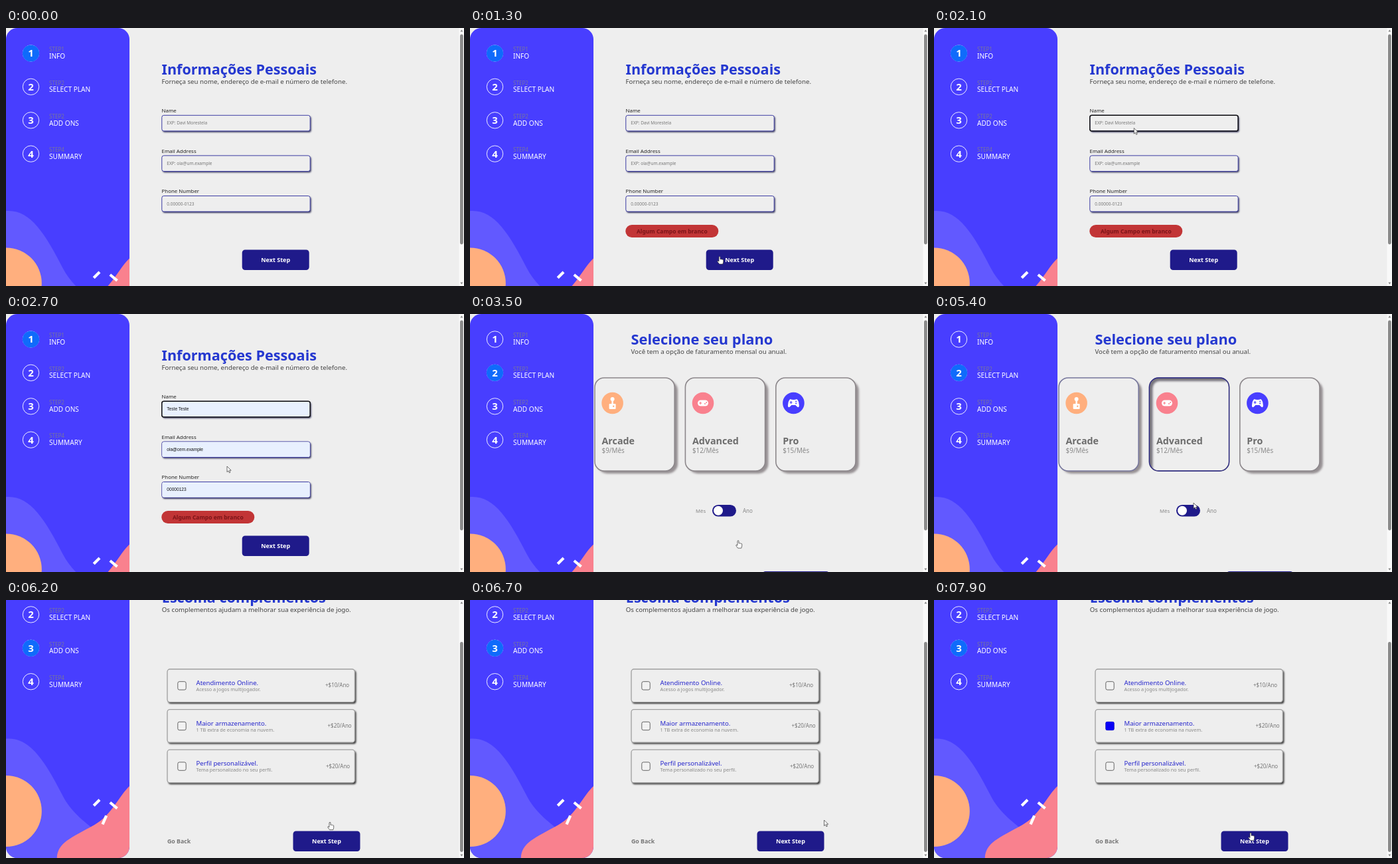
Write an HTML page that moves like this. It is 690 px wide and 388 px high and loops after 8000 ms.

```html
<!DOCTYPE html>
<html lang="pt">
<head>
<meta charset="utf-8">
<title>Formulário em etapas</title>
<style>
  html, body { margin: 0; width: 100%; height: 100%; overflow: hidden; background: #eee; }
  svg { display: block; width: 100vw; height: 100vh; }
  text { font-family: "Noto Sans", "Open Sans", sans-serif; white-space: pre; }
  .filled text { font-family: "Liberation Sans", Arial, sans-serif; }
  .soft { filter: blur(.8px); }
  .wide { filter: blur(1.6px); }
</style>
</head>
<body>
<svg id="stage" viewBox="0 0 690 388"></svg>
<script>
const LOOP = 8000, STEP = 100, SCROLL = 66.5;
const NAVY = '#1f1a8a', BLUE = '#2538d0', VIOLET = '#483eff', PEACH = '#ffaf7e', PINK = '#f9818e';

const rect = (x, y, w, h, r, fill, extra = '') =>
  `<rect x="${x}" y="${y}" width="${w}" height="${h}" rx="${r}" fill="${fill}" ${extra}/>`;
const circle = (x, y, r, fill, extra = '') =>
  `<circle cx="${x}" cy="${y}" r="${r}" fill="${fill}" ${extra}/>`;
const path = (d, fill, extra = '') => `<path d="${d}" fill="${fill}" ${extra}/>`;
const line = (color, width) => `stroke="${color}" stroke-width="${width}"`;
const text = (x, y, size, fill, str, weight = 400, anchor = 'start') =>
  `<text x="${x}" y="${y}" font-size="${size}" fill="${fill}" font-weight="${weight}" text-anchor="${anchor}">${str}</text>`;
const group = (id, body, extra = '') => `<g id="${id}" ${extra}>${body}</g>`;
const each = (list, fn) => list.map(fn).join('');

const heading = (x, y, size, title, sub) =>
  text(x, y, size, BLUE, title, 700) + text(x, y + 14, 9.7, '#444', sub);
const button = (x, y) =>
  rect(x, y, 101, 30.5, 4.5, NAVY) + text(x + 50.5, y + 18.7, 9, '#fff', 'Next Step', 700, 'middle');
const goBack = y => text(243, y, 8.8, '#777', 'Go Back', 700);

// Sidebar
const labels = [['STEP1', 'INFO'], ['STEP2', 'SELECT PLAN'], ['STEP2', 'ADD ONS'], ['STEP4', 'SUMMARY']];
const sidebar = `<clipPath id="side">${rect(0, 0, 186, 454.5, 17, '#000')}</clipPath>` +
  group('sidebar',
    rect(0, 0, 186, 455, 0, VIOLET) +
    path('M-13.8 277.9C30.9 264.2 54.9 301.6 85.8 361.6C116.7 421.5 204 432 169.6 490H-20Z', '#6259ff') +
    path('M220 343.7C179.2 321.3 174 381.8 133.5 404.5C93 427 74 433 77 462H230Z', PINK) +
    circle(0.2, 384, 53.6, PEACH) +
    path('M132.2 375.8L141 367M156.8 371L167.5 379.8M145.5 403.8L151.2 390.8', 'none', line('#fff', 4.2)),
    'clip-path="url(#side)"') +
  each(labels, ([small, big], i) => {
    const y = 38 + 50.4 * i;
    return circle(37.5, y, 12.2, 'none', line('#fff', 0.9)) +
      circle(37.5, y, 12.6, '#0f6bfb', `id="on${i}"`) +
      text(37.5, y + 5.4, 15, '#fff', i + 1, 700, 'middle') +
      text(65, y - 2.8, 8.1, '#77749c', small) +
      text(65, y + 8, 10.1, '#fff', big);
  });

// Personal details
const fields = [
  ['Name', 'EXP: Davi Morestela', 'Teste Teste'],
  ['Email Address', 'EXP: ola@um.example', 'ola@cem.example'],
  ['Phone Number', '0.00000-0123', '00000123']
];
const fieldY = i => 131.3 + 60.6 * i;
const info =
  heading(234.5, 70, 21.6, 'Informações Pessoais', 'Forneça seu nome, endereço de e-mail e número de telefone.') +
  each(fields, ([label], i) => {
    const y = fieldY(i);
    return text(234.5, y - 4.3, 7.9, '#222', label, 500) +
      rect(236.2, y + 1.8, 223.5, 23.6, 3, '#33335a', 'class="soft"') +
      rect(234.8, y, 223.4, 23.6, 3, '#eee', line('#3e3ea4', 1));
  }) +
  group('empty', each(fields, ([, hint], i) => text(242.3, fieldY(i) + 14, 6.55, '#777', hint))) +
  group('filled', each(fields, ([, , value], i) =>
    rect(235.3, fieldY(i) + .5, 222.4, 22.6, 2.5, '#e8f0fe') +
    text(242.3, fieldY(i) + 13.8, 6.6, '#111', value)), 'class="filled"') +
  rect(234.8, 131.3, 223.4, 23.6, 3, 'none', 'id="focus" ' + line('#101010', 1.5)) +
  group('alert', rect(234.3, 296, 140, 19, 9.5, '#c23536') +
    text(304.3, 308.6, 8.5, '#7b1418', 'Algum Campo em branco', 700, 'middle')) +
  button(355.7, 333.5);

// Plans
const icons = [
  rect(-5, 1, 10, 8, 1.2, '#fff') + rect(-1.2, -4, 2.4, 6, 0, '#fff') + circle(0, -6, 3, '#fff') +
    circle(1.6, 4.8, 1.2, PEACH),
  rect(-8, -4.6, 16, 9.2, 4.6, '#fff') + path('M-5.8 0h4M-3.8 -2v4', 'none', line(PINK, 1.2)) +
    circle(3, 1, 1, PINK) + circle(5.2, -1, 1, PINK),
  path('M-5 -6Q0 -4 5 -6Q8 -4 8.5 4Q8 8 5 5L3 3H-3L-5 5Q-8 8 -8.5 4Q-8 -4 -5 -6Z', '#fff') +
    path('M-5.8 -1h4M-3.8 -3v4', 'none', line(VIOLET, 1.2)) + circle(3.8, -2.6, 1, VIOLET) + circle(3.8, .6, 1, VIOLET)
];
const plans = [['Arcade', 9, PEACH], ['Advanced', 12, PINK], ['Pro', 15, VIOLET]];
const price = (id, format) =>
  group(id, each(plans, ([, n], i) => text(198.5 + 136.4 * i, 209, 9.9, '#8a8a8a', format(n))));
const plan =
  heading(242.5, 46, 21.8, 'Selecione seu plano', 'Você tem a opção de faturamento mensal ou anual.') +
  each(plans, ([name, , color], i) => {
    const x = 188 + 136.4 * i, shape = [x, 96, 120.2, 140, 14];
    return group('lift' + i, rect(x + 4, 100, 121, 140, 15, '#969093', 'class="wide"')) +
      rect(...shape, '#eee', `id="card${i}" ` + line('#8c878b', 1.6)) +
      group('press' + i,
        `<clipPath id="clip${i}">${rect(...shape, '#000')}</clipPath>` +
        `<g clip-path="url(#clip${i})">` +
        rect(x + 1.5, 97.5, 132, 152, 14, 'none', 'class="wide" ' + line('#77747c', 7)) + '</g>' +
        rect(...shape, 'none', line('#2a2887', 1.3))) +
      `<g transform="translate(${x + 26.6} 134)">${circle(0, 0, 16.3, color)}${icons[i]}</g>` +
      text(x + 10.5, 196, 14.3, '#6c6c6c', name, 600);
  }) +
  price('monthly', n => `$${n}/Mês`) + price('yearly', n => `$${n * 10}/Ano`) +
  text(340, 299, 7.8, '#888', 'Mês') + text(411, 299, 8, '#888', 'Ano') +
  rect(365, 287, 36, 17.6, 8.8, NAVY) + circle(374, 295.8, 7, '#fff', 'id="knob"') +
  goBack(405.5) + button(440.5, 387);

// Add-ons
const extras = [
  ['Atendimento Online.', 'Acesso a jogos multijogador.', '+$10/Ano', 481],
  ['Maior armazenamento.', '1 TB extra de economia na nuvem.', '+$20/Ano', 484.5],
  ['Perfil personalizável.', 'Tema personalizado no seu perfil.', '+$20/Ano', 482]
];
const addons =
  heading(234.8, 70, 21.6, 'Escolha complementos', 'Os complementos ajudam a melhorar sua experiência de jogo.') +
  each(extras, ([name, note, cost, x], i) => {
    const y = 170.5 + 60.6 * i;
    return rect(244.5, y + 2, 283, 50, 4, '#3c3c3c', 'class="soft"') +
      rect(243, y, 282.4, 49.6, 4, '#eee', line('#a0a0a0', 1.3)) +
      rect(258.8, y + 18.7, 12.4, 12.4, 2.4, '#f2f2f2', line('#555', .9)) +
      rect(258.5, y + 18.4, 13, 13, 2.2, '#0a00f5', `id="tick${i}"`) +
      text(286.5, y + 24, 9.6, '#2424cc', name) +
      text(286.5, y + 33.2, 7.25, '#888', note) +
      text(x, y + 27.4, 8, '#777', cost);
  }) +
  goBack(432.8) + button(432.5, 414);

// Pointer shapes, hot spot at 0,0
const edge = 'stroke="#333" stroke-width=".7" stroke-linejoin="round"';
const pointers =
  group('arrow', path('M0 0V8.6L2 6.8L3.4 9.8L4.9 9.1L3.5 6.2H6.2Z', '#fff', edge)) +
  group('hand', path('M-1 .8Q0 -.6 1 .8V4.4Q2 3.6 2.7 4.5Q3.7 3.9 4.3 4.8Q5.5 4.4 5.7 5.6V8.4L4.8 11.6H-.4L-3.2 7.8Q-3.4 6.4 -2 6.7L-1 7.6Z', '#fff', edge)) +
  group('beam', path('M-1.8 -4Q0 -4 0 -3V3Q0 4 -1.8 4M1.8 -4Q0 -4 0 -3M0 3Q0 4 1.8 4', 'none', line('#777', .8)));

const bar = rect(682.5, 0, 8, 388, 0, '#f9f9f9') +
  path('M684.4 5.5L686.4 2.5L688.4 5.5ZM684.4 382.5L686.4 385.5L688.4 382.5Z', '#858585') +
  rect(684, 9.5, 4.8, 316, 2.4, '#8a8a8a', 'id="thumb"');

document.getElementById('stage').innerHTML =
  rect(0, 0, 690, 388, 0, '#eee') +
  group('page', group('info', info) + group('plan', plan) + group('addons', addons) + sidebar) +
  bar + group('pointer', pointers);

const $ = id => document.getElementById(id);
const show = (id, on) => { $(id).style.display = on ? '' : 'none'; };
const clamp = v => Math.min(1, Math.max(0, v));
const ease = v => v * v * (3 - 2 * v);

// time, x, y, pointer shape from then on
const moves = [
  [100, 505, 386, 'arrow'], [600, 388, 348, 'hand'], [800, 376, 343.5, 'hand'],
  [1400, 376, 343.5, 'arrow'], [1800, 300, 143, 'beam'], [2000, 300, 143, 'arrow'],
  [2300, 305, 172, 'beam'], [2700, 333, 229, 'arrow'], [3100, 404, 345, 'hand'],
  [3600, 404, 340, 'arrow'], [4100, 290, 195, 'hand'], [4300, 279, 181, 'hand'],
  [4600, 279, 183, 'hand'], [4900, 385, 190, 'hand'], [5100, 387, 195, 'hand'],
  [5400, 391, 284, 'arrow'], [5500, 388, 294, 'hand'], [5700, 388, 294, 'arrow'],
  [6100, 488, 334, 'hand'], [6300, 488, 334, 'arrow'], [6500, 533.5, 331, 'arrow'],
  [6700, 533.5, 331, 'arrow'], [7300, 265, 188, 'hand'], [7600, 265, 188, 'hand'],
  [7900, 477, 350, 'hand']
];

function point(t) {
  show('pointer', t >= moves[0][0]);
  let i = 0;
  while (i < moves.length - 1 && moves[i + 1][0] <= t) i++;
  const a = moves[i], b = moves[i + 1] || a;
  const k = b === a ? 0 : ease(clamp((t - a[0]) / (b[0] - a[0])));
  $('pointer').setAttribute('transform',
    `translate(${a[1] + (b[1] - a[1]) * k} ${a[2] + (b[2] - a[2]) * k})`);
  for (const id of ['arrow', 'hand', 'beam']) show(id, id === a[3]);
}

function draw(t) {
  const view = t < 3300 ? 0 : t < 6200 ? 1 : 2;
  ['info', 'plan', 'addons'].forEach((id, i) => {
    show(id, view === i);
    show('on' + i, view === i);
  });
  show('on3', false);

  show('alert', t >= 900);
  show('focus', t >= 1900);
  show('filled', t >= 2300);
  show('empty', t < 2300);

  const picked = t >= 4900 ? 1 : -1;
  for (let i = 0; i < 3; i++) {
    show('press' + i, i === picked);
    show('lift' + i, i !== picked);
    show('tick' + i, i === 1 && t >= 7600);
  }
  $('card0').setAttribute('stroke', t >= 4900 ? '#77779c' : '#8c878b');

  const year = clamp((t - 5500) / 200);
  show('monthly', year === 0);
  show('yearly', year > 0);
  $('knob').setAttribute('cx', 374 + 18 * year);

  const scroll = ease(clamp((t - 5700) / 300));
  $('page').setAttribute('transform', `translate(0 ${-SCROLL * scroll})`);
  $('thumb').setAttribute('y', 9.5 + 53.5 * scroll);
  point(t);
}

function tick(now) {
  draw(Math.floor(now % LOOP / STEP) * STEP);
  requestAnimationFrame(tick);
}
draw(0);
requestAnimationFrame(tick);
</script>
</body>
</html>
```
